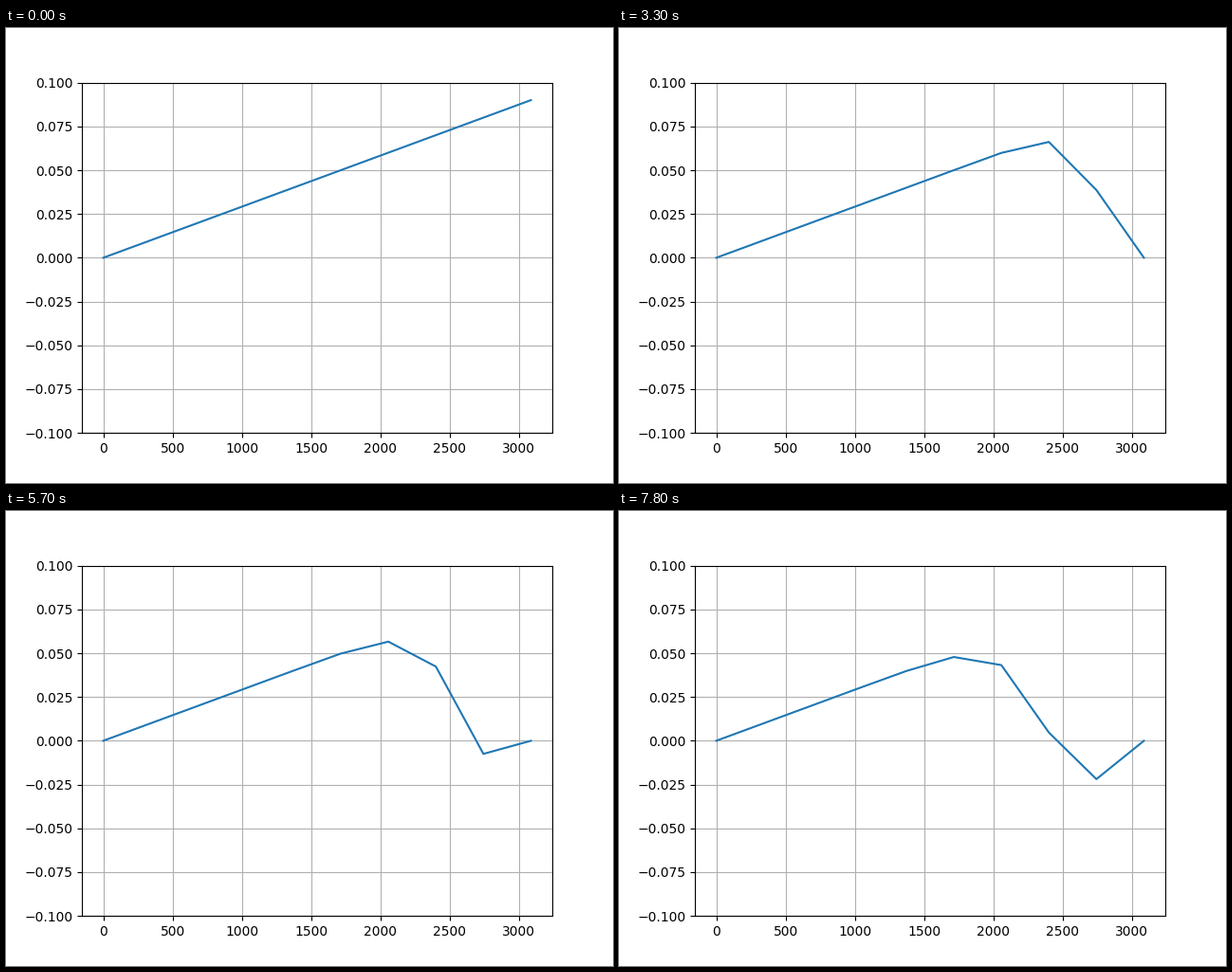
A matplotlib script for the animation above (8000 ms loop, 640 by 480 pixels).

```python
import numpy as np
import matplotlib.pyplot as plt
from matplotlib.animation import FuncAnimation

SPEED = 343.0          # wave speed
DX = 343.0             # spacing of the string's nodes
DT = 0.1               # time step
NODES = 10
STEPS = 27
INTERVAL = 100         # ms per frame
FRAMES_PER_STEP = 3
FRAMES = 80


def simulate():
    """Leapfrog solution of the wave equation with both ends held at zero."""
    ratio = (SPEED * DT / DX) ** 2
    u = np.zeros((STEPS, NODES))
    u[0] = 0.01 * np.arange(NODES)
    u[1, :-1] = u[0, :-1]
    for n in range(1, STEPS - 1):
        bend = u[n, 2:] - 2 * u[n, 1:-1] + u[n, :-2]
        u[n + 1, 1:-1] = 2 * u[n, 1:-1] - u[n - 1, 1:-1] + ratio * bend
    return u


x = DX * np.arange(NODES)
states = simulate()

fig, ax = plt.subplots(figsize=(6.4, 4.8), dpi=100)
line, = ax.plot(x, states[0])
ax.set_ylim(-0.1, 0.1)
ax.grid(True)


def update(frame):
    line.set_ydata(states[frame // FRAMES_PER_STEP])
    return line,


anim = FuncAnimation(fig, update, frames=FRAMES, interval=INTERVAL,
                     repeat=True, repeat_delay=0)
plt.show()
```
